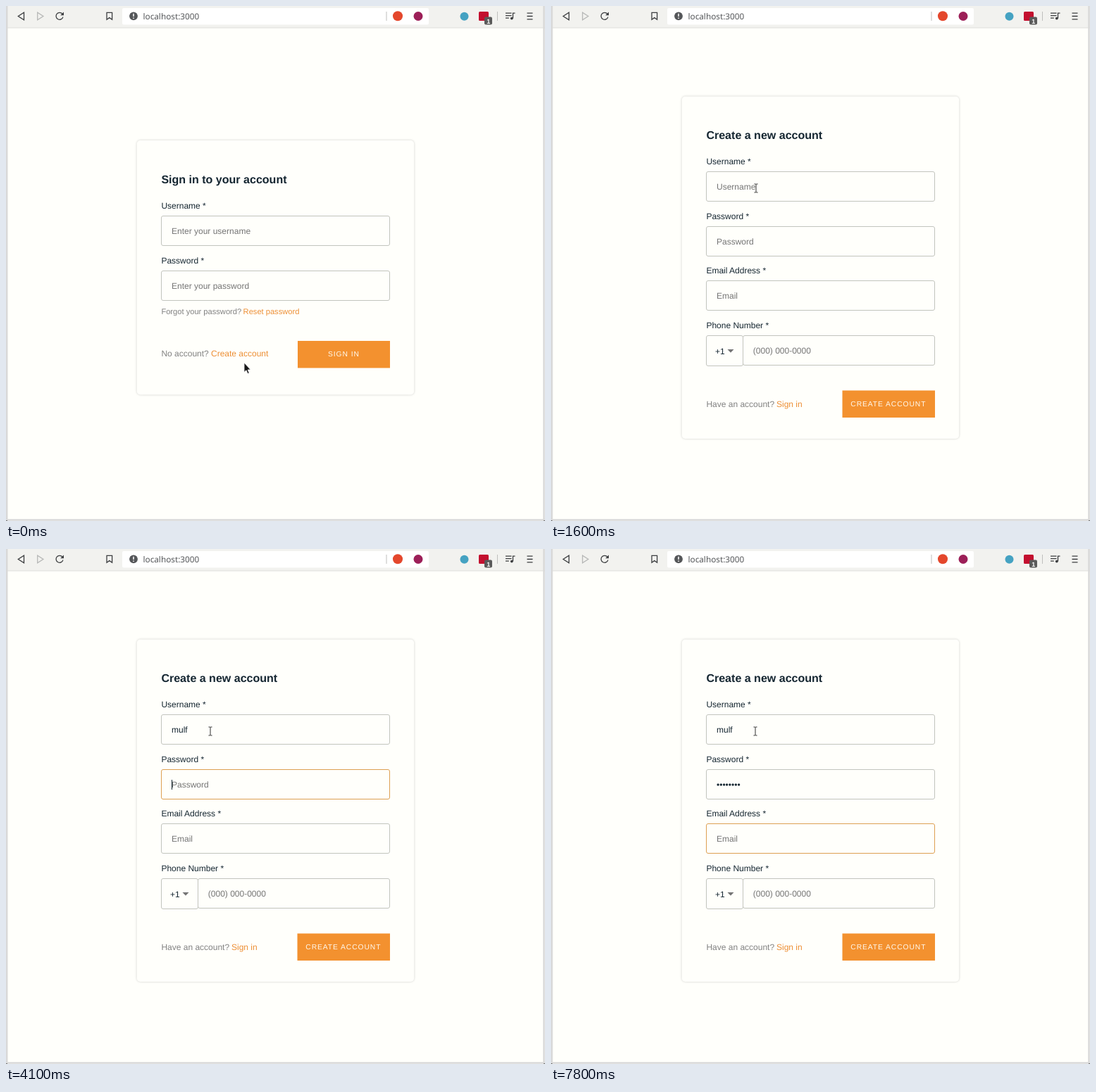
Animation, 765 px wide and 732 px high, one loop 8 s. Source, as an HTML page:

```html
<!DOCTYPE html>
<html lang="en">
<head>
<meta charset="utf-8">
<title>Sign up form</title>
<style>
  html, body { margin: 0; height: 100%; overflow: hidden; background: #fffffb; }
  svg { display: block; width: 100vw; height: 100vh; }
  text { font: 12px "Liberation Sans", Arial, sans-serif; fill: #152631; white-space: pre; text-rendering: geometricPrecision; }
  .title { font-size: 16.04px; font-weight: bold; }
  .hint { fill: #757575; }
  .muted { fill: #828282; }
  .link { fill: #ed8f35; }
  .small { font-size: 11.14px; }
  .caps { font-size: 10.286px; letter-spacing: .943px; fill: #fffaf0; }
  .url { font: 11.75px "Noto Sans", "Open Sans", sans-serif; fill: #55575a; }
  .card { fill: #fffffb; filter: drop-shadow(.8px .9px 1.6px rgba(0, 0, 0, .2)); }
  .box { fill: none; stroke: #c2c4be; }
  .box.focus { stroke: #dda052; }
  .button { fill: #f3912f; }
  .icon { fill: none; stroke: #3c3e40; stroke-width: 1.3; }
</style>
</head>
<body>
<svg id="stage" viewBox="0 0 765 732" xmlns="http://www.w3.org/2000/svg">
  <rect width="765" height="732" fill="#fffffb"/>
  <rect width="765" height="31" fill="#f2f2ef"/>
  <path d="M0 31H765" stroke="#dededb"/>
  <path d="M1.25 0V732M763.5 0V732M0 730.5H765" stroke="#d9d9d9" stroke-width="2.5"/>
  <path d="M0 731.5H2M763 731.5H765" stroke="#777"/>

  <g id="toolbar">
    <rect x="165" y="3" width="435" height="23.5" rx="2" fill="#fff"/>
    <path class="icon" d="M25.5 9.3V19.7L17.3 14.5Z"/>
    <path class="icon" d="M44.7 9.3V19.7L52.9 14.5Z" style="stroke:#b7b8b7"/>
    <path class="icon" d="M80 11.2A5 5 0 1 0 80.9 15.6" stroke-width="1.6"/>
    <path d="M82 8.5V13.3H77.2Z" fill="#3c3e40"/>
    <path class="icon" d="M143 9.4H150.6V19.3L146.8 16.6 143 19.3Z"/>
    <circle cx="181" cy="14.3" r="5.9" fill="#55575a"/>
    <path d="M181 10.8V15.1M181 16.4V18" stroke="#fff" stroke-width="1.5"/>
    <text class="url" x="194.5" y="18.7">localhost:3000</text>
    <path d="M540 8V21M697.5 8V21" stroke="#bfbfbd"/>
    <circle cx="556" cy="14.3" r="7" fill="#e4472c"/>
    <circle cx="585" cy="14.5" r="6.5" fill="#9c1f58"/>
    <circle cx="650.5" cy="14.8" r="6" fill="#45a2c2"/>
    <rect x="671" y="8" width="14" height="13" rx="1.5" fill="#c3102f"/>
    <rect x="679" y="15.5" width="11" height="11" rx="2" fill="#5a5a5a"/>
    <text x="682.2" y="24.6" style="font-size:9px;font-weight:bold;fill:#fff">1</text>
    <path class="icon" d="M709 10.2H717.5M709 13.7H717.5M709 17.2H713.8M719.5 17.5V10.2H722.5" stroke-width="1.5"/>
    <circle cx="717.8" cy="17.6" r="1.9" fill="#3c3e40"/>
    <path class="icon" d="M739.5 10.2H747.5M739.5 14.5H747.5M739.5 18.8H747.5" stroke-width="1.5"/>
  </g>

  <g id="signIn"></g>
  <g id="signUp"></g>
  <rect id="caret" width="1" height="14" fill="#152631"/>

  <g id="pointer" stroke-linejoin="round">
    <path id="arrow" d="M0 0V13.5L3 10.8 5 15.6 7.2 14.7 5.2 10H9.2Z" fill="#181818" stroke="#fff" stroke-width=".8"/>
    <path id="hand" d="M-1 8V.5A1.3 1.3 0 0 1 1.6 .5V5L6.4 5.9Q8.2 6.3 8.2 8L7.6 11.4Q7.4 12.7 6.6 13.5V14.4H-.3V13.5L-5 8.6Q-5.8 7.2-4.6 6.6-3.6 6.2-2.6 7.2Z" fill="#fff" stroke="#202020"/>
    <path id="beam" d="M-2.5-6H-.8L0-5.4.8-6H2.5M0-5.4V5.4M-2.5 6H-.8L0 5.4.8 6H2.5" fill="none" stroke="#303030"/>
  </g>
</svg>

<script>
const $ = id => document.getElementById(id);
const text = (x, y, s, cls = '', id = '') => `<text x="${x}" y="${y}" class="${cls}" id="${id}">${s}</text>`;
const rect = (x, y, w, h, cls, rx = 0, id = '') =>
  `<rect x="${x}" y="${y}" width="${w}" height="${h}" rx="${rx}" class="${cls}" id="${id}"/>`;
const field = (y, label, hint, id) =>
  text(220.4, y - 10.5, label + ' *') +
  rect(220.5, y, 324, 42, 'box', 2.5, id + 'Box') +
  text(235, y + 25.5, hint, 'hint', id + 'Text');

$('signIn').innerHTML =
  rect(185.7, 191, 393.5, 361.5, 'card', 5) +
  text(220.4, 252, 'Sign in to your account', 'title') +
  field(298.5, 'Username', 'Enter your username', 'loginName') +
  field(376.5, 'Password', 'Enter your password', 'loginPass') +
  text(220.4, 438, 'Forgot your password?', 'muted small') +
  text(336.6, 438, 'Reset password', 'link small') +
  text(220.4, 498, 'No account?', 'muted') +
  text(291, 498, 'Create account', 'link') +
  '<path id="underline" d="M291 499.5H372" stroke="#ed8f35"/>' +
  '<rect id="outline" x="291" y="487" width="80.5" height="14" rx="2" fill="none" stroke="#101214" stroke-width="2"/>' +
  rect(414, 476, 131, 38.5, 'button') +
  text(457, 498.2, 'SIGN IN', 'caps');

$('signUp').innerHTML =
  rect(185.7, 128.5, 393.5, 486.5, 'card', 5) +
  text(220.4, 189, 'Create a new account', 'title') +
  field(235.5, 'Username', 'Username', 'name') +
  field(313.5, 'Password', 'Password', 'pass') +
  field(390.5, 'Email Address', 'Email', 'mail') +
  text(220.4, 458, 'Phone Number *') +
  rect(272.5, 468.5, 272, 42, 'box', 2.5) +
  rect(220.5, 468.5, 52, 43, 'box', 2.5) +
  text(233, 495, '+1') +
  '<path d="M250.5 488H259.5L255 492.8Z" fill="#757575"/>' +
  text(286.8, 494, '(000) 000-0000', 'hint') +
  text(220.4, 570, 'Have an account?', 'muted') +
  text(320, 570, 'Sign in', 'link') +
  rect(413.5, 546.5, 131.5, 38.5, 'button') +
  text(425.3, 569, 'CREATE ACCOUNT', 'caps');

const LOOP = 8000;
const USER = 'mulf';
const hints = { name: 'Username', pass: 'Password', mail: 'Email' };
const caretTop = { name: 250, pass: 328, mail: 405 };
const nameKeys = [2900, 3100, 3400, 3600];
const passKeys = [5100, 5400, 5500, 5700, 6000, 6100, 6300, 6500];
const focusSteps = [[1700, 'name'], [4100, 'pass'], [7200, 'mail']];
const blinks = [[2300, 2900], [4700, 5100], [7800, LOOP]];
// time, x, y of the pointer's hot spot
const approach = [[0, 338, 507], [100, 339, 505], [200, 341.5, 499], [300, 344.5, 494], [400, 345.8, 492]];

const typed = (keys, t) => keys.filter(k => k <= t).length;
const latest = (steps, t) => steps.filter(s => s[0] <= t).pop();
const show = (id, on) => $(id).setAttribute('visibility', on ? 'inherit' : 'hidden');
const ease = p => p * p * (3 - 2 * p);

function pointerAt(t) {
  if (t < 800) {
    const [, x, y] = latest(approach, t);
    return [t < 200 ? 'arrow' : 'hand', x, y];
  }
  const p = ease(Math.min(1, Math.max(0, (t - 900) / 700)));
  return ['beam', t < 1700 ? 344 - 53 * p : 290, 494 - 235 * p];
}

function fill(id, value) {
  const node = $(id + 'Text');
  node.textContent = value || hints[id];
  node.setAttribute('class', value ? '' : 'hint');
}

function draw(time) {
  const t = Math.floor(time % LOOP / 100) * 100;
  $('signIn').setAttribute('visibility', t < 800 ? 'visible' : 'hidden');
  $('signUp').setAttribute('visibility', t < 800 ? 'hidden' : 'visible');
  show('underline', t >= 200 && t < 800);
  show('outline', t >= 600 && t < 800);

  const values = {
    name: USER.slice(0, typed(nameKeys, t)),
    pass: '•'.repeat(typed(passKeys, t)),
    mail: ''
  };
  const focus = (latest(focusSteps, t) || [])[1];
  for (const id in values) {
    fill(id, values[id]);
    $(id + 'Box').classList.toggle('focus', id === focus);
  }

  show('caret', focus && !blinks.some(([from, to]) => t >= from && t < to));
  if (focus) {
    const width = values[focus] ? $(focus + 'Text').getComputedTextLength() : 0;
    $('caret').setAttribute('x', Math.round(235 + width));
    $('caret').setAttribute('y', caretTop[focus]);
  }

  const [shape, x, y] = pointerAt(t);
  for (const id of ['arrow', 'hand', 'beam']) show(id, id === shape);
  $('pointer').setAttribute('transform', `translate(${x} ${y})`);
}

const start = performance.now();
function tick() {
  draw(performance.now() - start);
  requestAnimationFrame(tick);
}
tick();
</script>
</body>
</html>
```
